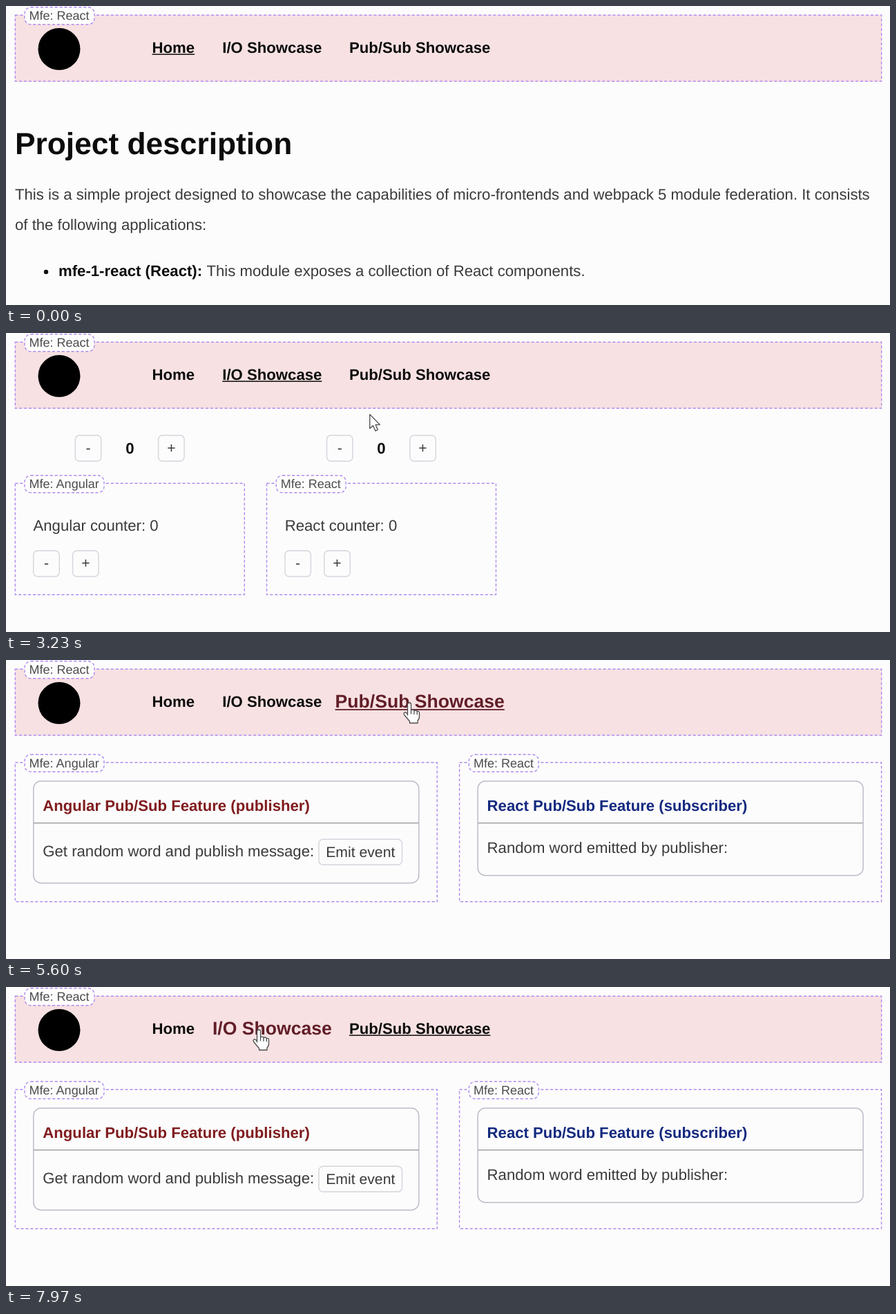
An HTML page that plays this animation: 1280x434 px, repeating every 8000 ms.

```html
<!DOCTYPE html>
<html lang="en">
<head>
<meta charset="utf-8">
<title>Micro-frontend showcase</title>
<style>
  html, body { margin: 0; width: 100%; height: 100%; overflow: hidden; background: #fcfcfc; }
  svg { display: block; width: 100vw; height: 100vh; }
  text { font: 22.16px "Liberation Sans", Arial, sans-serif; fill: #3a3a3a; text-rendering: geometricPrecision; white-space: pre; }
  .bold { font-weight: bold; fill: #0c0c0c; }
  .title { font-size: 44.3px; }
  .label { font-size: 18px; fill: #4c4c4c; }
  .button { font-size: 21.2px; text-anchor: middle; }
  .middle { text-anchor: middle; }
  .publisher { fill: #801c1e; }
  .subscriber { fill: #14297f; }
  .dashed { fill: none; stroke: #b08cf0; stroke-width: 1.4; stroke-dasharray: 4.15 2.77; }
  .pill { fill: #fdfdfd; }
  .box { fill: none; stroke: #bebcc9; stroke-width: 1.5; }
  .key { fill: none; stroke: #d6d4dd; stroke-width: 1.4; }
  .cursor { fill: #fff; stroke: #4a4a4a; stroke-width: 1.3; stroke-linejoin: round; stroke-linecap: round; }
</style>
</head>
<body>
<svg id="stage" viewBox="0 0 1280 434" preserveAspectRatio="none"></svg>
<script>
const LOOP = 8000;
const stage = document.getElementById("stage");

function add(parent, tag, attrs = {}, content = "") {
  const node = document.createElementNS("http://www.w3.org/2000/svg", tag);
  for (const name in attrs) node.setAttribute(name, attrs[name]);
  node.textContent = content;
  return parent.appendChild(node);
}
const group = (parent = stage) => add(parent, "g");
const text = (parent, x, y, content, style = "") => add(parent, "text", { x, y, class: style }, content);
const rect = (parent, x, y, width, height, style, rx = 0) =>
  add(parent, "rect", { x, y, width, height, rx, class: style });

function frame(parent, x, y, width, height, name, labelWidth) {
  rect(parent, x, y, width, height, "dashed");
  rect(parent, x + 13.7, y - 11.5, labelWidth, 25, "dashed pill", 9);
  text(parent, x + 20.3, y + 6.7, "Mfe: " + name, "label");
}

function button(parent, x, y, width, height, caption) {
  rect(parent, x, y, width, height, "key", 6);
  text(parent, x + width / 2, y + height / 2 + 6.7, caption, "button");
}

// Navigation bar
const nav = group();
add(nav, "rect", { x: 13, y: 13, width: 1255, height: 96.5, fill: "#f7e1e2" });
frame(nav, 13.3, 13.3, 1254.4, 96, "React", 101);
add(nav, "circle", { cx: 77, cy: 62.5, r: 30.5, fill: "#000" });

function link(x, width, caption) {
  const node = group(nav);
  const label = text(node, x, 67.8, caption, "bold");
  const underline = add(node, "rect", { x, y: 69.4, width, height: 1.5 });
  return { node, label, underline, center: x + width / 2 };
}
const links = [
  link(211.5, 61.5, "Home"),
  link(313.3, 144, "I/O Showcase"),
  link(497, 204.4, "Pub/Sub Showcase"),
];

// Home page
const home = group();
text(home, 13, 215, "Project description", "bold title");
text(home, 13, 281, "This is a simple project designed to showcase the capabilities of micro-frontends and webpack 5 module federation. It consists");
text(home, 13, 325, "of the following applications:");
add(home, "circle", { cx: 58, cy: 386, r: 3.2, fill: "#111" });
text(home, 76, 391.5, "mfe-1-react (React):", "bold");
text(home, 290.5, 391.5, "This module exposes a collection of React components.");

// Counters page
const counters = group();
[["Angular", 0, 115], ["React", 364.2, 101]].forEach(([name, dx, labelWidth]) => {
  button(counters, 100.3 + dx, 148.5, 37.5, 37.5, "-");
  text(counters, 179.3 + dx, 174.5, "0", "bold middle");
  button(counters, 220.6 + dx, 148.5, 37.5, 37.5, "+");
  frame(counters, 13.3 + dx, 218.3, 332, 161.5, name, labelWidth);
  text(counters, 39.5 + dx, 287.3, name + " counter: 0");
  button(counters, 39.7 + dx, 316, 37.5, 37.5, "-");
  button(counters, 96.6 + dx, 316, 37.5, 37.5, "+");
});

// Publish / subscribe page
const pubsub = group();
function feature(x, name, labelWidth, height, role) {
  frame(pubsub, x, 148.8, 611, 202, name, labelWidth);
  rect(pubsub, x + 26.5, 175.8, 558, height, "box", 11);
  add(pubsub, "rect", { x: x + 27, y: 235.8, width: 557, height: 1.6, fill: "#a3a2a8" });
  text(pubsub, x + 40, 218.6, `${name} Pub/Sub Feature (${role})`, "bold " + role);
}
feature(13.3, "Angular", 115, 148, "publisher");
text(pubsub, 53.3, 284.6, "Get random word and publish message:");
button(pubsub, 453, 260.3, 120.5, 37, "Emit event");
feature(656.6, "React", 101, 137, "subscriber");
text(pubsub, 696.6, 279.6, "Random word emitted by publisher:");

// Pointers, each with its hot spot at 0,0
const arrow = add(stage, "path", {
  class: "cursor", d: "M.5 0V20.5L5.2 16.4 8.6 24 12 22.4 8.8 15H15.1Z",
});
const hand = add(stage, "path", {
  class: "cursor",
  d: "M-2.5 18V2.5a2.5 2.5 0 0 1 5 0V11q2.5-2 4.5.6 2.5-1.5 4.3 1 3-.8 3.2 2V20q0 4-2.5 6V29.5H.5V27L-7 18q-2-3 .5-4 2-.5 4 3ZM2.5 11v5M7 12v4.5M11.3 13v4",
});

const pages = [home, counters, pubsub];
const clicks = [2730, 5200];
const hovers = [
  { link: 1, from: 1780, to: 2860 },
  { link: 2, from: 4370, to: 6130 },
  { link: 1, from: 7715, to: 9000 },
];
const path = [
  [1370, 337, 420], [1950, 408, 84], [2200, 408, 84], [2370, 414, 73],
  [2730, 414, 73], [3300, 531, 120], [4170, 531, 120], [4550, 584, 62],
  [6030, 584, 62], [6400, 575, 122], [6870, 575, 122], [7300, 470, 140],
  [7670, 376, 80], [7970, 366, 62],
];

const clamp = v => Math.min(1, Math.max(0, v));
const smooth = v => v * v * (3 - 2 * v);
const mix = (a, b, k) => a + (b - a) * k;
const show = (node, visible) => node.setAttribute("visibility", visible ? "visible" : "hidden");

function pointerAt(t) {
  const next = path.findIndex(point => point[0] > t);
  if (next < 0) return path[path.length - 1].slice(1);
  if (next === 0) return path[0].slice(1);
  const [t0, x0, y0] = path[next - 1], [t1, x1, y1] = path[next];
  const k = smooth((t - t0) / (t1 - t0));
  return [mix(x0, x1, k), mix(y0, y1, k)];
}

function hoverAmount(index, t) {
  return Math.max(0, ...hovers.filter(h => h.link === index).map(h =>
    smooth(clamp((t - h.from) / 220)) * (1 - smooth(clamp((t - h.to) / 220)))));
}

function draw(t) {
  const active = clicks.filter(time => t >= time).length;
  pages.forEach((page, i) => show(page, i === active));
  links.forEach(({ node, label, underline, center }, i) => {
    const k = hoverAmount(i, t);
    const color = `rgb(${mix(12, 98, k)},${mix(12, 30, k)},${mix(12, 40, k)})`;
    node.setAttribute("transform", `translate(${center} 60.5) scale(${1 + 0.2 * k}) translate(${-center} -60.5)`);
    label.style.fill = underline.style.fill = color;
    show(underline, i === active);
  });

  const [x, y] = pointerAt(t);
  const hovering = hovers.some(h => t >= h.from && t < h.to);
  for (const pointer of [arrow, hand]) {
    pointer.setAttribute("transform", `translate(${x} ${y})`);
    show(pointer, t >= path[0][0] && (pointer === hand) === hovering);
  }
}

const start = performance.now();
function tick() {
  draw((performance.now() - start) % LOOP);
  requestAnimationFrame(tick);
}
tick();
</script>
</body>
</html>
```
